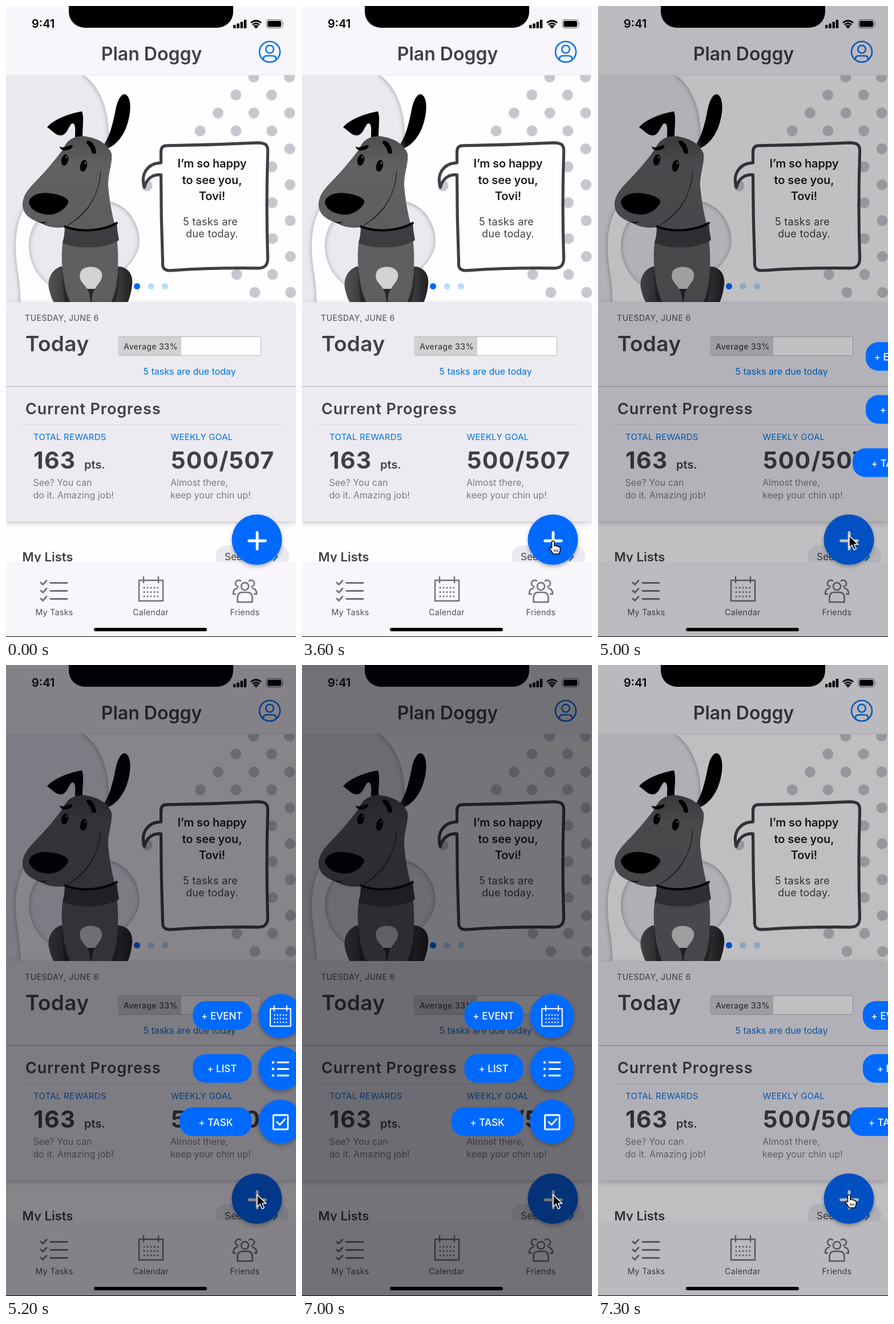
Recreate the animation shown at these times as an HTML page. Size 508 px wide and 1102 px high, loop 7400 ms.

```html
<!DOCTYPE html>
<html lang="en">
<head>
<meta charset="utf-8">
<title>Plan Doggy</title>
<style>
html, body { margin: 0; width: 100%; height: 100%; overflow: hidden; background: #fff; }
svg { display: block; width: 100%; height: 100%; }
text { font-family: Inter, Roboto, sans-serif; fill: #414044; white-space: pre; }
.mid { text-anchor: middle; }
.semi { font-weight: 600; }
.blue { fill: #0072e0; }
.bubble { font-size: 20px; font-weight: 600; fill: #1d1c20; letter-spacing: -.1px; }
.due { font-size: 18px; letter-spacing: .3px; }
.label { font-size: 15px; letter-spacing: .22px; fill: #0072e0; }
.big { font-size: 41px; font-weight: 700; letter-spacing: 1.2px; }
.note { font-size: 16px; fill: #7c7a80; letter-spacing: .05px; }
.tab { font-size: 14.2px; letter-spacing: .3px; text-anchor: middle; fill: #514f55; }
.pill { font-size: 17px; font-weight: 500; text-anchor: middle; fill: #fff; }
.line { fill: none; stroke-linecap: round; stroke-linejoin: round; }
</style>
</head>
<body>
<svg viewBox="0 0 508 1102" preserveAspectRatio="none">
<defs>
  <clipPath id="hero"><path d="M0 121H508V518H0Z"/></clipPath>
  <clipPath id="list"><path d="M0 900H508V971H0Z"/></clipPath>
  <filter id="shade" x="-20%" y="-20%" width="140%" height="150%">
    <feDropShadow dx="0" dy="3" stdDeviation="3" flood-color="#000" flood-opacity=".3"/>
  </filter>
  <filter id="soft" x="-10%" y="-10%" width="120%" height="120%">
    <feDropShadow dx="0" dy="3" stdDeviation="5" flood-color="#000" flood-opacity=".22"/>
  </filter>
  <filter id="paper" x="-10%" y="-10%" width="120%" height="120%">
    <feDropShadow dx="0" dy="1" stdDeviation="4" flood-color="#000" flood-opacity=".35"/>
  </filter>
  <linearGradient id="legL"><stop offset="0" stop-color="#555456"/><stop offset="1" stop-color="#2b2a2c"/></linearGradient>
  <linearGradient id="legR"><stop offset="0" stop-color="#555456"/><stop offset=".9" stop-color="#252426"/></linearGradient>
  <linearGradient id="ear" x1="0" y1="1" x2=".35" y2=".6"><stop offset="0" stop-color="#4a494b"/><stop offset=".6" stop-color="#000"/></linearGradient>
  <linearGradient id="coat" x1="0" y1="0" x2="0" y2="1"><stop offset="0" stop-color="#4d4c4e"/><stop offset=".3" stop-color="#616062"/><stop offset="1" stop-color="#5d5c5e"/></linearGradient>
  <g id="calendar" class="line" stroke-width="2.4">
    <path d="M-21-15H21V21H-21ZM-13-21V-11M13-21V-11"/>
    <path d="M-12-2H13M-12 5.500H13M-12 13H13" stroke-width="3" stroke-dasharray="0 6"/>
  </g>
</defs>

<rect width="508" height="1102" fill="#fefdff"/>

<!-- hero -->
<g clip-path="url(#hero)">
  <rect y="121" width="508" height="397" fill="#ebe9f0"/>
  <path filter="url(#paper)" fill-rule="evenodd" fill="#fefdff" d="M137 121C164 140 182 182 180 230C174 300 60 300 29 360C10 400 19 450 22 470Q26 495 26 530H530V100H137ZM180 341C212 346 234 378 234 410C234 442 205 462 190 478C160 510 105 515 72 485C50 468 38 440 40 414C42 385 58 365 80 355C110 345 150 337 180 341Z"/>
  <g id="dots" fill="#c9c6cf"><circle cx="247" cy="314" r="9.5"/></g>
  <path transform="translate(.5 .8)" d="M281 243Q360 242 440 238C455 238 459 242 458 256Q455 350 458 440C458 453 452 457 441 457Q360 456 290 461C277 462 273 457 274 446Q271 370 271 294C255 293 245 302 242 316C235 294 246 274 271 273V254Q271 243 281 243Z" fill="#fefdff" stroke="#413f45" stroke-width="5.200" stroke-linejoin="round"/>

  <!-- dog -->
  <path d="M95 455C78 462 71 480 76 497Q79 510 84 518H120V455Z" fill="url(#legL)"/>
  <path d="M200 455C216 458 223 471 221 487Q219 505 213 518H172V455Z" fill="url(#legR)"/>
  <path d="M100 408C94 445 100 490 113 518H184C196 490 199 445 194 405Z" fill="#5f5e60"/>
  <path d="M100 456C99 482 105 505 113 518H103C100 500 98 478 100 456ZM197 455C198 482 192 505 184 518H191C197 500 200 478 197 455Z" fill="#29282a"/>
  <path d="M130 466C133 453 163 451 168 467C170 480 159 487 156 494H142C139 487 126 480 130 466Z" fill="#d2d1d3"/>
  <path d="M142 494H156Q151 500 150 518H148Q147 500 142 494Z" fill="#29282a"/>
  <path d="M168 247C181 231 187 207 192 181C196 162 202 154 208 154C216 156 219 170 217 186C213 216 200 238 180 248Z" fill="url(#ear)"/>
  <path d="M100 250C107 233 119 228 134 227C153 229 176 236 185 258C187 275 178 293 179 315Q182 350 191 384Q145 403 102 390L106 386C88 389 70 386 60 378C44 374 28 364 29 344C32 324 47 312 59 299Q80 277 100 250Z" fill="url(#coat)"/>
  <path d="M166 289C164 325 148 357 108 383C134 368 160 346 166 289Z" fill="#252426" stroke="#252426"/>
  <path d="M52 375Q62 379 72 376Q67 383 58 378Z" fill="#1b1a1c"/>
  <path d="M72 212C80 201 104 189 133 184C137 194 134 212 134 227L121 229C121 219 123 207 117 205C111 204 108 226 96 226C86 226 80 216 72 212Z"/>
  <path d="M40 343C42 330 60 325 76 327C96 329 111 336 109 343C106 352 94 362 80 364C60 366 42 356 40 343Z"/>
  <ellipse cx="103" cy="269" rx="6" ry="10" transform="rotate(14 103 269)"/>
  <ellipse cx="136" cy="279" rx="6" ry="10.500" transform="rotate(12 136 279)"/>
  <circle cx="106" cy="264" r="1.500" fill="#777"/><circle cx="139" cy="274" r="1.500" fill="#777"/>
  <path d="M94 245C100 250 108 243 116 243C118 246 115 249 110 251C102 254 95 252 94 245ZM141 236C149 232 158 244 158 257C153 260 150 257 149 252C148 244 141 244 141 236Z"/>
  <path d="M103 384C130 398 168 394 194 378Q195 394 198 409C172 425 126 425 99 414Q103 400 103 384Z" fill="#3e3c40"/>
  <path d="M103 385C130 396 170 393 194 379" class="line" stroke="#000" stroke-width="4"/>
  <circle cx="229.500" cy="489.500" r="5.500" fill="#006aff"/>
  <circle cx="254" cy="489.500" r="5.500" fill="#b9ddf8"/><circle cx="278.500" cy="489.500" r="5.500" fill="#b9ddf8"/>
</g>
<text class="bubble mid" x="361" y="282">I’m so happy</text>
<text class="bubble mid" x="361" y="311">to see you,</text>
<text class="bubble mid" x="361" y="339">Tovi!</text>
<text class="due" x="310" y="383">5 tasks are</text>
<text class="due" x="315" y="404">due today.</text>

<!-- header -->
<path d="M0 0H508V121H0Z" fill="#f8f6fa"/>
<path d="M0 120.500H508" stroke="#e6e4e9"/>
<path d="M110 0V10A28 28 0 0 0 138 38H370A28 28 0 0 0 398 10V0Z"/>
<text class="semi" x="45" y="38" font-size="20" style="fill:#000">9:41</text>
<g fill="#000">
  <rect x="398" y="33" width="4.500" height="6" rx="1.300"/><rect x="404.300" y="30.500" width="4.500" height="8.500" rx="1.300"/>
  <rect x="410.500" y="27.500" width="4.500" height="11.500" rx="1.300"/><rect x="416.700" y="24" width="4.500" height="15" rx="1.300"/>
  <path d="M433.500 35Q438 31 442.500 35L438 39.500Z"/>
  <path d="M429 29.500Q438 22 447 29.500M432 33Q438 27.500 444 33" fill="none" stroke="#000" stroke-width="2.700"/>
  <rect x="456" y="24" width="28" height="14.500" rx="4" fill="none" stroke="#8b898d" stroke-width="1.300"/>
  <rect x="458" y="26" width="24" height="10.500" rx="2.300"/><path d="M485.500 29Q488 31.200 485.500 33.500Z" fill="#8b898d"/>
</g>
<text class="mid semi" x="255" y="94.500" font-size="32">Plan Doggy</text>
<g fill="none" stroke="#0a74f0" stroke-width="2.600">
  <circle cx="462" cy="80" r="18"/><circle cx="462" cy="75.500" r="6.800"/>
  <path d="M451 94V92Q451 87 457 87H467Q473 87 473 92V94"/>
</g>

<!-- panels -->
<path filter="url(#soft)" d="M0 527Q0 517 10 517H498Q508 517 508 527V900H0Z" fill="#edebf1"/>
<path d="M0 664.500H508" stroke="#a9a7ad" stroke-width="1.200"/>
<path d="M28 731.500H483" stroke="#d6d4da"/>
<text x="33" y="550" font-size="14" font-weight="500" letter-spacing=".5" style="fill:#656369">TUESDAY, JUNE 6</text>
<text class="semi" x="34" y="603" font-size="37" letter-spacing=".4">Today</text>
<rect x="197" y="577.500" width="249.500" height="33" rx="3" fill="#fefdff" stroke="#b7b5ba"/>
<path d="M307 578V610H200Q197.500 610 197.500 607V581Q197.500 578 200 578Z" fill="#d1d0d3"/>
<text x="206" y="600" font-size="14" font-weight="500" letter-spacing=".4">Average 33%</text>
<text class="blue" x="240.500" y="644" font-size="16">5 tasks are due today</text>
<text class="semi" x="34" y="713" font-size="27" letter-spacing=".9">Current Progress</text>
<text class="label" x="48" y="758">TOTAL REWARDS</text>
<text class="label" x="288.500" y="758">WEEKLY GOAL</text>
<text class="big" x="48" y="808">163</text>
<text class="semi" x="137" y="808" font-size="20">pts.</text>
<text class="big" x="289" y="808">500/507</text>
<text class="note" x="47.500" y="838">See? You can</text>
<text class="note" x="47.500" y="859.500">do it. Amazing job!</text>
<text class="note" x="288" y="838">Almost there,</text>
<text class="note" x="288" y="859.500">keep your chin up!</text>

<!-- list and tab bar -->
<g clip-path="url(#list)">
  <text class="semi" x="28.500" y="970" font-size="22">My Lists</text>
  <rect x="367" y="942" width="129" height="38" rx="19" fill="#ebe9ef"/>
  <text x="383" y="968" font-size="17">See all</text>
  <path d="M469 956L475 962L469 968" class="line" stroke="#0072e0" stroke-width="2.500"/>
</g>
<path d="M0 971H508V1102H0Z" fill="#f8f6fa"/>
<g class="line" stroke="#717075" stroke-width="2.800">
  <path d="M78 1007.500H107M78 1021.500H107M78 1035.500H107M61 1007L64.500 1010.500L71 1003.500M61 1021L64.500 1024.500L71 1017.500M61 1035L64.500 1038.500L71 1031.500"/>
  <use href="#calendar" x="254" y="1018"/>
  <g stroke-width="2.500">
    <circle cx="418.500" cy="1013.500" r="6.500"/>
    <path d="M405.500 1041V1034Q405.500 1024 414 1024H423Q431.500 1024 431.500 1034V1041ZM411 1004A5.600 5.600 0 1 0 407 1014M426 1004A5.600 5.600 0 1 1 430 1014M405 1017Q398 1018 398 1027H402M432 1017Q439 1018 439 1027H435"/>
  </g>
</g>
<text class="tab" x="84.500" y="1064">My Tasks</text>
<text class="tab" x="253.500" y="1064">Calendar</text>
<text class="tab" x="418.500" y="1064">Friends</text>
<rect x="154" y="1086" width="198" height="6" rx="3"/>
<rect y="1101" width="508" height="1"/>

<circle cx="439.500" cy="932" r="44" fill="#006aff" filter="url(#shade)"/>
<path d="M425.500 934H454.500M440 919.500V948.500" class="line" stroke="#fff" stroke-width="4.800"/>

<rect id="dim" width="508" height="1102" fill="#06040c" opacity="0"/>

<g id="menu">
  <g fill="#006aff">
    <rect x="284.500" y="587" width="103" height="50" rx="22"/>
    <rect x="284.500" y="679.500" width="103" height="50" rx="22"/>
    <rect x="261.500" y="772.500" width="126" height="50" rx="22"/>
    <g filter="url(#shade)"><circle cx="438" cy="613" r="38.500"/><circle cx="438" cy="704.500" r="38.500"/><circle cx="438" cy="797.500" r="38.500"/></g>
  </g>
  <text class="pill" x="335.500" y="619">+ EVENT</text>
  <text class="pill" x="335.500" y="711">+ LIST</text>
  <text class="pill" x="324.500" y="804.500">+ TASK</text>
  <g class="line" stroke="#fff" stroke-width="2.800">
    <use href="#calendar" transform="translate(438 613) scale(.85)"/>
    <path d="M433 694H452M433 705.500H452M433 717H452"/>
    <path d="M425 694H425.010M425 705.500H425.010M425 717H425.010" stroke-width="4.500"/>
    <rect x="425.500" y="786" width="25.500" height="25" rx="1.500"/><path d="M432 798L437 803L446 793"/>
  </g>
</g>

<g id="cursor">
  <path id="arrow" d="M0 0V21L5 16.500L8.500 24.500L12.200 23L8.800 15.200H15.500Z" stroke="#fff" stroke-width="1.500"/>
  <g id="hand" fill="#fff" stroke="#000" stroke-width="1.500" stroke-linejoin="round">
    <path d="M-2.500 2C-2.500-.5 2-.5 2 2V9C3 7.500 5.500 8 5.700 9.500C7 8.500 9 9 9.200 10.800C10.500 10 12.300 11 12.300 13V16C12 19 10.500 20 10.500 23H-.5C-1 20-4 17-6.500 13.500C-7.500 11.500-5 10.300-2.500 13Z"/>
    <path d="M2 15V19.500M5 15V19.500M8 15V19.500" stroke-width="1.100"/>
  </g>
</g>
</svg>
<script>
const LOOP = 7400, OPEN = 4850, CLOSE = 7115, SLIDE = 500, TRAVEL = 334;
const $ = id => document.getElementById(id);
const clamp = x => Math.max(0, Math.min(1, x));

// staggered dots, counted inward from the right edge
[2, 2, 3, 3, 1, 1, 1, 1, 1, 1, 1, 2, 2].forEach((count, row) => {
  for (let k = 0; k < count; k++) {
    const dot = $('dots').firstElementChild.cloneNode();
    dot.setAttribute('cx', 496.5 + row * .17 - k * 62.7 - row % 2 * 31.4);
    dot.setAttribute('cy', 124 + row * 31.35);
    $('dots').append(dot);
  }
});

// cubic-bezier(0, 0, .58, 1)
function easeOut(x) {
  let lo = 0, hi = 1;
  for (let i = 0; i < 24; i++) {
    const s = (lo + hi) / 2;
    if (1.74 * s * s - .74 * s ** 3 < x) lo = s; else hi = s;
  }
  return lo * lo * (3 - 2 * lo);
}

// time, x, y of the pointer tip
const path = [[1500, 398, 1110], [1700, 412, 985], [1800, 422, 936], [2100, 440, 934], [3900, 440, 934], [4600, 440, 925], [LOOP, 440, 925]];
function pointer(t) {
  const i = Math.max(1, path.findIndex(p => p[0] >= t));
  const [a, b] = [path[i - 1], path[i]];
  const k = clamp((t - a[0]) / (b[0] - a[0]));
  return [a[1] + (b[1] - a[1]) * k, a[2] + (b[2] - a[2]) * k];
}

const show = (id, on) => $(id).setAttribute('visibility', on ? 'visible' : 'hidden');

function draw(t) {
  const shown = easeOut(clamp((t - OPEN) / SLIDE)) - easeOut(clamp((t - CLOSE) / SLIDE));
  $('dim').setAttribute('opacity', .55 * shown);
  $('menu').setAttribute('transform', `translate(${TRAVEL * (1 - shown)} 0)`);
  show('menu', shown > 0);
  const onButton = t >= 1900 && t < OPEN || t >= 7100;
  show('hand', onButton);
  show('arrow', t >= 1500 && !onButton);
  $('cursor').setAttribute('transform', `translate(${pointer(t)})`);
}

const start = performance.now();
function tick() {
  draw((performance.now() - start) % LOOP);
  requestAnimationFrame(tick);
}
tick();
</script>
</body>
</html>
```
